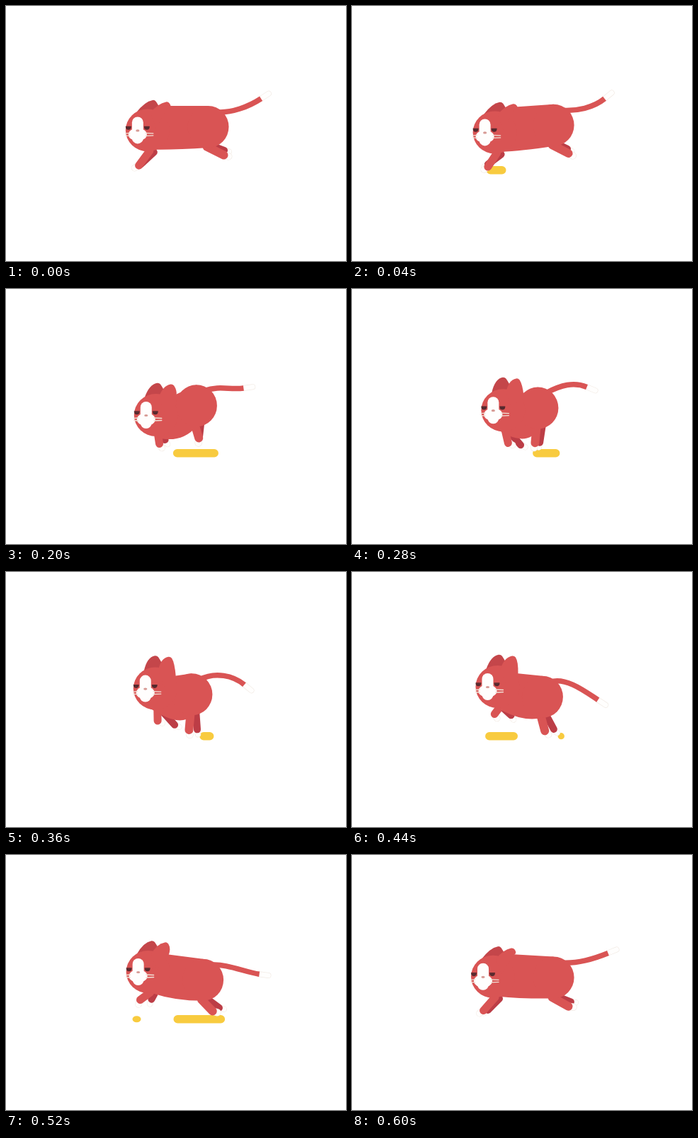
An HTML page with a canvas for the animation above (0.64 s loop, 480 by 360 pixels).

```html
<!DOCTYPE html>
<html lang="en">
<head>
<meta charset="utf-8">
<title>Running cat</title>
<style>
html, body { margin: 0; width: 100%; height: 100%; overflow: hidden; background: #fff; }
canvas { display: block; width: 480px; height: 360px; }
</style>
</head>
<body>
<canvas id="stage" width="480" height="360"></canvas>
<script>
const ctx = document.getElementById('stage').getContext('2d');
const RED = '#d95454', DARK = '#bc3d46', EAR = '#c4464a', YELLOW = '#f8cb3f';
const WHITE = '#fffefd', EDGE = '#f2ebe5', EYE = '#56292e', HAIR = '#f2e2d8';
const LOOP = 640, STEP = 40, FLOOR = 231.7;
let now = 0;

// Swing around mid, highest at time peak; cycles counts swings per loop.
function wave(mid, amp, peak, cycles = 1) {
  return mid + amp * Math.cos(2 * Math.PI * cycles * (now - peak) / LOOP);
}

function line(x1, y1, x2, y2, width, color) {
  ctx.beginPath();
  ctx.moveTo(x1, y1);
  ctx.lineTo(x2, y2);
  ctx.lineWidth = width;
  ctx.strokeStyle = color;
  ctx.stroke();
}

function oval(x, y, rx, ry, color) {
  ctx.beginPath();
  ctx.ellipse(x, y, rx, ry, 0, 0, Math.PI * 2);
  ctx.fillStyle = color;
  ctx.fill();
}

// White paw or tail tip pointing along an angle in degrees.
function whiteEnd(x, y, degrees, length, width) {
  const a = degrees * Math.PI / 180;
  const tx = x + length * Math.cos(a), ty = y + length * Math.sin(a);
  line(x, y, tx, ty, width, EDGE);
  line(x, y, tx, ty, width - 1.4, WHITE);
}

function leg(hipX, hipY, x, y, pawAngle, width, color) {
  whiteEnd(x, y, pawAngle, 7, width - 1.5);
  line(hipX, hipY, x, y, width, color);
}

function hindLegs(x, y) {
  const paw = wave(55, 48, 260);
  leg(x - 23, y + 28, wave(287, 22, 610), wave(212, 11, 395), paw, 10, DARK);
  leg(x - 31, y + 29, wave(282, 25.5, 0), wave(215.5, 9, 420), paw, 12, RED);
}

function frontLegs(x, y) {
  const paw = wave(85, 65, 0);
  const lift = wave(0, 1, 0, 2);
  leg(x + 23, y + 31, wave(215, 25, 320), wave(214, 6, 130) + 8 * lift, paw, 10, DARK);
  leg(x + 17, y + 29, wave(203, 17.5, 270), wave(215, 11, 110) + 5 * lift, paw, 11, RED);
}

function tail(x, y) {
  const endX = wave(346.5, 15, 595);
  const endY = wave(149.5, 20, 440) + wave(0, 12, 140, 2);
  const angle = wave(0, 40, 380), a = angle * Math.PI / 180;
  whiteEnd(endX, endY, angle, 13, 8);
  ctx.beginPath();
  ctx.moveTo(x - 18, y - 20);
  ctx.bezierCurveTo(x + 4, y - 20 + wave(-5, 7, 0),
    endX - 20 * Math.cos(a), endY - 20 * Math.sin(a), endX, endY);
  ctx.lineCap = 'butt';
  ctx.lineWidth = 7.5;
  ctx.strokeStyle = RED;
  ctx.stroke();
  ctx.lineCap = 'round';
}

function ear(x, y, tipX, tipY, endX, endY, color) {
  ctx.beginPath();
  ctx.moveTo(x, y);
  ctx.quadraticCurveTo(tipX - 13, tipY + 2, tipX - 2, tipY);
  ctx.quadraticCurveTo(tipX + 1, tipY - 0.5, tipX + 3, tipY + 2);
  ctx.quadraticCurveTo(tipX + 7, tipY + 8, endX, endY);
  ctx.lineTo(x + 8, y + 22);
  ctx.fillStyle = color;
  ctx.fill();
}

// Back and belly stretch between the head and the round rear.
function torso(x, y, rearX, rearY, nape) {
  const hipX = rearX - 29;
  ctx.beginPath();
  ctx.moveTo(x + 20, y);
  ctx.lineTo(x + 43, nape);
  ctx.lineTo(hipX, rearY - 28.5);
  ctx.lineTo(hipX, rearY + 30.5);
  ctx.quadraticCurveTo(x + 52, wave(211, 8, 290), x + 22, wave(203.5, 8, 170));
  ctx.lineTo(x - 8, y + 20);
  ctx.fillStyle = RED;
  ctx.fill();
  oval(hipX, rearY + 1, 29, 29.5, RED);
}

function face(x, y) {
  line(x, y - 11, x, y + 11, 16, WHITE);
  oval(x, y + 6, 13, 9, WHITE);
  oval(x, y + 0.5, 2.6, 1.6, '#d79a94');
  for (const side of [-13, 13]) {
    ctx.beginPath();
    ctx.arc(x + side, y - 4.5, 3.8, 0, Math.PI);
    ctx.fillStyle = EYE;
    ctx.fill();
    line(x + side - 3.4, y - 5, x + side + 3.4, y - 5, 1.4, EYE);
    const reach = side > 0 ? 22 : -17, root = side * 0.85;
    line(x + root, y + 4, x + reach, y + 4.5, 1.3, HAIR);
    line(x + root, y + 8, x + reach, y + 7.5, 1.3, HAIR);
  }
}

// A dash that shoots out behind the cat, then is used up from the left.
function streak(born, life, ease, limit) {
  const age = now - born;
  if (age < 0 || age > life) return;
  const left = 178 + 122 * Math.pow(age / life, ease);
  const right = Math.min(limit, 190 + 1.1 * age);
  const w = Math.min(11.5, right - left);
  if (w > 1) line(left + w / 2, FLOOR, right - w / 2, FLOOR, w, YELLOW);
}

function draw() {
  ctx.fillStyle = '#fff';
  ctx.fillRect(0, 0, 480, 360);
  ctx.lineCap = 'round';

  const x = wave(192.2, 7.2, 270), y = wave(171.5, 9.5, 117);
  const rearX = wave(302.5, 12, 0), rearY = wave(169.5, 6.3, 482);
  const nape = wave(144.5, 4.5, 250), fold = wave(0, 1, 0);

  streak(15, 470, 0.8, rearX + 2);
  streak(400, 190, 1.6, rearX + 2);
  if (now > 500 && now < 580) oval(184.5, FLOOR, 6, 4.5, YELLOW);

  tail(rearX, rearY);
  hindLegs(rearX, rearY);
  frontLegs(x, y);
  const backX = x + 19 + 4 * fold, backY = y - 44.5 + 2 * fold;
  ear(x - 2, y - 25, backX, backY, backX + 12, backY + 18, EAR);
  torso(x, y, rearX, rearY, nape);
  oval(x + 14, y, 31, 30, RED);
  ear(x + 18, y - 25, x + 38 + 4 * fold, y - 42.5 + 2.5 * fold, x + 43, nape + 1, RED);
  face(x, y);
}

const start = performance.now();
function tick() {
  const t = (performance.now() - start) % LOOP;
  now = Math.floor(t / STEP) * STEP;
  draw();
  requestAnimationFrame(tick);
}
tick();
</script>
</body>
</html>
```
